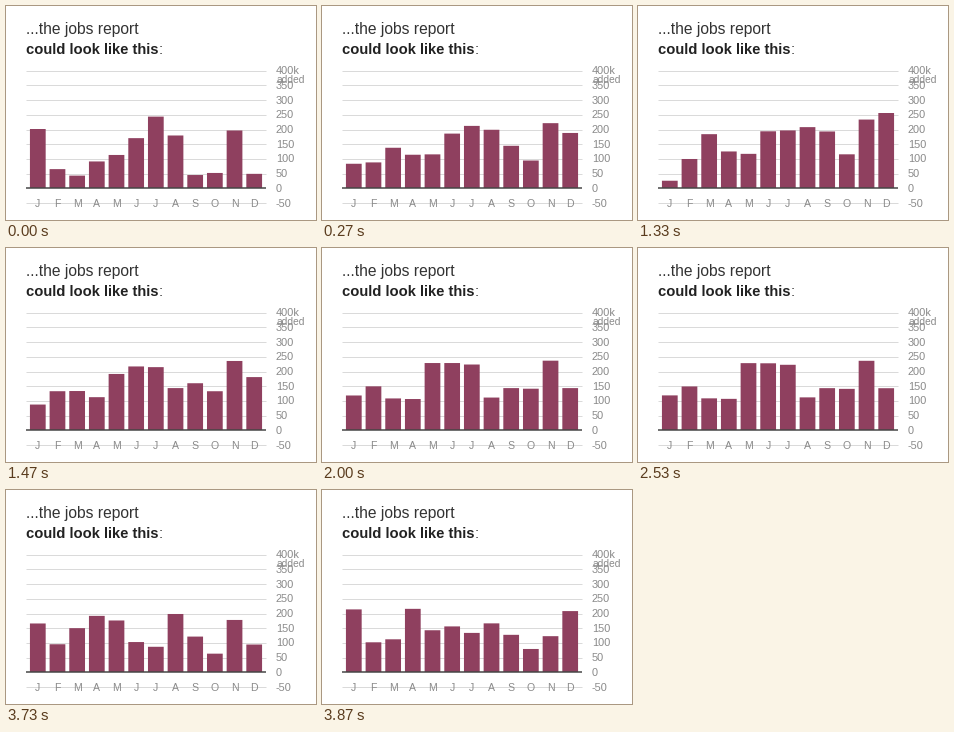
Animation of 310x214 px, one loop 3940 ms. Source, as a matplotlib script:

```python
import numpy as np
import matplotlib.pyplot as plt
from matplotlib.animation import FuncAnimation
from matplotlib.patches import Rectangle

W, H, DPI = 310, 214, 100
LOOP, STEP = 3940, 10            # ms
TICK = 200 / 3                   # the bars move 15 times a second
HOLD, FADE, LEAD = 18, 300, 36   # ticks per scenario, ms of easing, ms offset
LEFT, RIGHT, ZERO = 20, 260, 182
BAR, GRID, LABEL, INK = "#8f405f", "#dadada", "#8a8a8a", "#222222"

SCENARIOS = np.array([
    [200, 64, 42, 90, 112, 169, 242, 178, 44, 51, 195, 48],
    [24, 98, 183, 124, 115, 192, 195, 207, 192, 114, 232, 255],
    [117, 148, 107, 105, 227, 227, 222, 110, 142, 140, 235, 142],
    [164, 94, 149, 190, 175, 101, 85, 197, 120, 62, 177, 92],
    [236, 104, 92, 226, 125, 181, 156, 149, 129, 86, 94, 263],
], dtype=float)

plt.rcParams["font.family"] = "Liberation Sans"


def px(size):
    return size * 72 / DPI


def y_of(value):
    return ZERO - 0.295 * value


def ease(t):
    t = min(max(t, 0), 1)
    return 4 * t**3 if t < 0.5 else 1 - 4 * (1 - t)**3


def jobs(ms):
    tick = min(int((ms + 5) / TICK), 58)
    n, step = divmod(tick - 2, HOLD)
    p = ease((step * TICK + LEAD) / FADE)
    return SCENARIOS[n] * (1 - p) + SCENARIOS[n + 1] * p


fig = plt.figure(figsize=(W / DPI, H / DPI), dpi=DPI, facecolor="white")
ax = fig.add_axes([0, 0, 1, 1])
ax.set(xlim=(0, W), ylim=(H, 0))
ax.axis("off")


def label(x, y, s, size, color=LABEL, **kw):
    ax.text(x, y, s, fontsize=px(size), color=color, va="baseline", zorder=4, **kw)


def rule(y, color, width, z):
    ax.plot([LEFT, RIGHT], [y, y], color=color, lw=px(width), zorder=z,
            solid_capstyle="butt")


label(20, 28, "...the jobs report", 15.6, "#333333")
label(20, 48, "could look like this", 14.7, INK, weight="bold")
label(152.5, 48, ":", 15, "#333333")

for v in range(-50, 401, 50):
    if v:
        rule(int(y_of(v)) + 0.5, GRID, 1, 1)
    label(270, y_of(v) + 4, "400k" if v == 400 else str(v), 11)
label(271, 77, "added", 10.2)
rule(ZERO, "#444444", 1.5, 3)

band = (RIGHT - LEFT) / 12.2
bars = []
for i, month in enumerate("JFMAMJJASOND"):
    x = LEFT + band * (i + 0.2)
    bar = Rectangle((x, ZERO), 0.8 * band, 0, fc=BAR, lw=0, zorder=2, snap=False)
    bars.append(ax.add_patch(bar))
    label(x + 0.4 * band, 201, month, 10.5, ha="center")


def draw(i):
    for bar, v in zip(bars, jobs(i * STEP)):
        bar.set_y(y_of(v))
        bar.set_height(ZERO - y_of(v))
    return bars


anim = FuncAnimation(fig, draw, frames=LOOP // STEP, interval=STEP,
                     repeat=True, repeat_delay=0)
plt.show()
```
